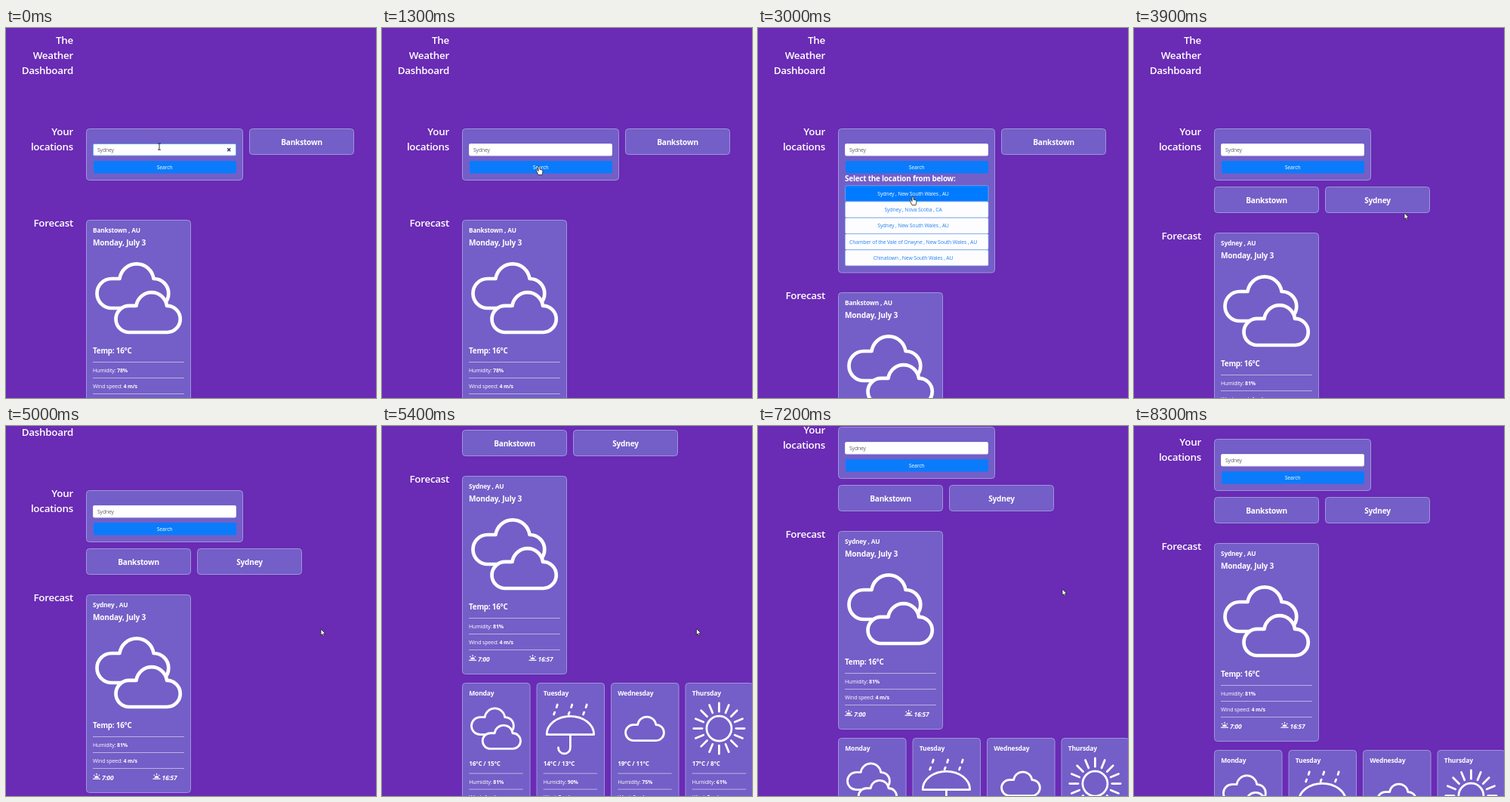
An HTML page with a canvas for the animation above (8400 ms loop, 490x490 px).

```html
<!DOCTYPE html>
<html lang="en">
<head>
<meta charset="utf-8">
<title>Weather</title>
<style>
html, body { margin: 0; width: 100%; height: 100%; overflow: hidden; background: #6a2bb5; }
canvas { display: block; width: 490px; height: 490px; }
</style>
</head>
<body>
<canvas id="stage"></canvas>
<script>
const LOOP = 8400, SIZE = 490;
const BG = '#6a2bb5', CARD = '#735fc7', EDGE = '#a093dd', RULE = '#bab0e4';
const canvas = document.getElementById('stage');
const ctx = canvas.getContext('2d');
const ratio = window.devicePixelRatio || 1;
canvas.width = canvas.height = SIZE * ratio;

const LIST_OPENS = 1500, PICKED = 3200;
const scrollKeys = [[4750, 0], [5000, 48], [5400, 205], [5900, 308], [6400, 308], [7100, 132], [7300, 132], [7600, 116]];
const pointerKeys = [
  [300, 203, 157], [800, 208, 183], [1500, 208, 183], [1900, 205, 238], [2050, 205, 238], [2200, 205, 223],
  [3200, 205, 223], [3900, 358, 245], [4500, 417, 269], [5000, 417, 269], [6100, 415, 267], [6400, 415, 267],
  [7100, 403, 216], [7300, 403, 216], [7800, 500, 190]
];
const places = [
  'Sydney , New South Wales , AU', 'Sydney , Nova Scotia , CA', 'Sydney , New South Wales , AU',
  'Chamber of the Vale of Orwyne , New South Wales , AU', 'Chinatown , New South Wales , AU'
];
const days = [
  ['Monday', clouds, '16°C / 15°C', '81%', '4 m/s'],
  ['Tuesday', umbrella, '14°C / 13°C', '90%', '3 m/s'],
  ['Wednesday', singleCloud, '19°C / 11°C', '75%', '6 m/s'],
  ['Thursday', sun, '17°C / 8°C', '61%', '5 m/s'],
  ['Friday', sunAndCloud, '17°C / 9°C', '58%', '4 m/s']
];

const ramp = (t, a, b) => Math.min(1, Math.max(0, (t - a) / (b - a)));

function track(keys, t, column, ease = p => p) {
  const next = keys.findIndex(key => key[0] > t);
  if (next === 0) return keys[0][column];
  if (next < 0) return keys[keys.length - 1][column];
  const a = keys[next - 1], b = keys[next];
  return a[column] + (b[column] - a[column]) * ease(ramp(t, a[0], b[0]));
}

function mix(from, to, p) {
  return `rgb(${from.map((v, i) => Math.round(v + (to[i] - v) * p))})`;
}

// Draws text whose capitals are centred on y; returns its width.
function text(str, x, y, size, { weight = 700, align = 'left', color = '#fff', style = '' } = {}) {
  ctx.font = `${style} ${weight} ${size}px "Open Sans", "Noto Sans", sans-serif`;
  ctx.letterSpacing = `${-0.02 * size}px`;
  ctx.textAlign = align;
  ctx.fillStyle = color;
  ctx.fillText(str, x, y + size * 0.36);
  return ctx.measureText(str).width;
}

function box(x, y, w, h, r, fill, edge, width = 1) {
  ctx.beginPath();
  ctx.roundRect(x, y, w, h, r);
  ctx.fillStyle = fill;
  ctx.fill();
  if (!edge) return;
  ctx.strokeStyle = edge;
  ctx.lineWidth = width;
  ctx.stroke();
}

const card = (x, y, w, h) => box(x, y, w, h, 4, CARD, EDGE);

function rule(x, y, w) {
  ctx.fillStyle = RULE;
  ctx.fillRect(x, y, w, 1);
}

function labelled(label, value, x, y) {
  const w = text(label + ' ', x, y, 7, { weight: 400 });
  text(value, x + w, y, 7);
}

function line(...points) {
  ctx.beginPath();
  for (let i = 0; i < points.length; i += 2) ctx.lineTo(points[i], points[i + 1]);
  ctx.stroke();
}

// Weather icons live in a 120 x 120 space.
const cloudPath = new Path2D('M19.5 0A19.5 19.5 0 0 1 19.5-39H30A22.7 22.7 0 0 1 75-39A19.5 19.5 0 0 1 75.5 0Z');

function cloud(x, y, scale) {
  ctx.save();
  ctx.translate(x, y);
  ctx.scale(scale, scale);
  ctx.lineWidth /= scale;
  ctx.fill(cloudPath);
  ctx.stroke(cloudPath);
  ctx.restore();
}

function clouds() {
  cloud(5, 73, 1);
  cloud(30, 105, 0.9);
}

function singleCloud() {
  cloud(17, 86.5, 0.91);
}

function rays(cx, cy, radius, inner, outer, count) {
  ctx.beginPath();
  ctx.arc(cx, cy, radius, 0, 2 * Math.PI);
  ctx.stroke();
  for (let i = 0; i < count; i++) {
    const c = Math.cos(2 * Math.PI * i / count), s = Math.sin(2 * Math.PI * i / count);
    line(cx + c * inner, cy + s * inner, cx + c * outer, cy + s * outer);
  }
}

function sun() {
  rays(60, 59.5, 28, 38, 57, 16);
}

function sunAndCloud() {
  rays(53, 52, 26, 35, 50, 8);
  cloud(30, 108, 0.9);
}

function umbrella() {
  ctx.beginPath();
  ctx.ellipse(60, 73, 53, 41, 0, Math.PI, 0);
  ctx.closePath();
  ctx.moveTo(60, 73);
  ctx.lineTo(60, 102.5);
  ctx.arc(46.5, 102.5, 13.5, 0, Math.PI);
  ctx.stroke();
  for (const x of [31, 64, 97]) {
    line(x, 6, x - 2, 12);
    line(x - 6, 23, x - 8, 28);
  }
}

function icon(draw, x, y, scale) {
  ctx.save();
  ctx.translate(x, y);
  ctx.scale(scale, scale);
  ctx.strokeStyle = '#fff';
  ctx.fillStyle = CARD;
  ctx.lineWidth = 4.7;
  ctx.lineCap = ctx.lineJoin = 'round';
  draw();
  ctx.restore();
}

function horizonSun(x, y) {
  ctx.fillStyle = ctx.strokeStyle = '#fff';
  ctx.lineWidth = 1.2;
  ctx.beginPath();
  ctx.arc(x, y + 1.5, 2.8, Math.PI, 0);
  ctx.fill();
  line(x - 5, y + 2.8, x + 5, y + 2.8);
  line(x, y - 4.5, x, y - 2.3);
  line(x - 3.8, y - 2.6, x - 2.8, y - 1.4);
  line(x + 3.8, y - 2.6, x + 2.8, y - 1.4);
}

function searchPanel(t, open) {
  card(106.5, 133.5, 207, open ? 190.5 : 68);
  const focused = t < 800;
  box(115.5, 153.5, 189, 15.5, 1.5, '#fff', focused ? '#6aa8fa' : '#ecebf8');
  text('Sydney', 121, 161.3, 6.8, { weight: 400, color: '#5b6068' });
  if (focused) {
    ctx.strokeStyle = '#27307c';
    ctx.lineWidth = 1.3;
    line(293.3, 159.3, 297.3, 163.3);
    line(297.3, 159.3, 293.3, 163.3);
  }
  box(116, 176, 189, 16.5, 1.5, '#0a7cfb');
  text('Search', 210, 184.4, 6.8, { weight: 400, align: 'center' });
  if (!open) return;

  text('Select the location from below:', 115, 199, 9.9);
  const enterFirst = ramp(t, 2160, 2310);
  const hover = [enterFirst, ramp(t, 1750, 1900) - enterFirst, 0, 0, 0];
  places.forEach((place, i) => {
    const y = 208.8 + i * 21.3;
    box(115.5, y, 189.5, 20.8, 1.5, mix([253, 253, 255], [0, 123, 255], hover[i]), '#8dbbf5', 0.6);
    const color = mix([40, 130, 240], [255, 255, 255], hover[i]);
    text(place, 205.5, y + 10.4, 6.9, { weight: 400, align: 'center', color });
  });
}

function place(name, x, y) {
  card(x, y, 138, 34);
  text(name, x + 69, y + 17.7, 10.1, { align: 'center' });
}

function today(y, city, humidity) {
  card(106.5, y + 0.5, 138, 262);
  text(city + ' , AU', 115, y + 14.3, 8.3);
  text('Monday, July 3', 115, y + 30.6, 10.1);
  icon(clouds, 115.5, y + 44, 1);
  text('Temp: 16°C', 115, y + 173.8, 9.8);
  for (const offset of [188, 209, 230]) rule(115, y + offset, 121);
  labelled('Humidity:', humidity, 115, y + 199.5);
  labelled('Wind speed:', '4 m/s', 115, y + 220.4);
  const clock = { style: 'italic' };
  horizonSun(120, y + 241.5);
  text('7:00', 127, y + 243.3, 8.3, clock);
  horizonSun(199.5, y + 241.5);
  text('16:57', 206.5, y + 243.3, 8.3, clock);
}

function dayCard([name, draw, temp, humidity, wind], i, top) {
  const x = 106.5 + (i % 4) * 98.5, y = top + Math.floor(i / 4) * 181, left = x + 8.7;
  card(x, y + 0.5, 89.5, 169);
  text(name, left, y + 14.3, 8.5);
  icon(draw, left + 0.3, y + 25.5, 0.59);
  text(temp, left, y + 106.7, 8.1);
  rule(left, y + 119.6, 71.5);
  labelled('Humidity:', humidity, left, y + 131);
  rule(left, y + 140.6, 71.5);
  labelled('Wind:', wind, left, y + 151.7);
}

function heading(str, y) {
  text(str, 89, y - 0.8, 13.4, { weight: 600, align: 'right' });
}

const arrow = new Path2D('M0 0V8.2L1.9 6.5 3.2 9.2 4.5 8.6 3.3 6 5.8 5.8Z');
const hand = new Path2D('M-1 1Q0-1 1 1V4.2L4 5Q5 5.5 5 7L4 11.5H-1L-3.2 7Q-3-0 -1 6.5Z');

function pointer(t) {
  const smooth = p => p * p * (3 - 2 * p);
  ctx.save();
  ctx.translate(track(pointerKeys, t, 1, smooth), track(pointerKeys, t, 2, smooth));
  ctx.strokeStyle = '#222';
  if (t < 550) {
    ctx.lineWidth = 0.9;
    line(0, -3.5, 0, 4);
    line(-2, -4, 2, -4);
    line(-2, 4.2, 2, 4.2);
  } else {
    const shape = t < PICKED ? hand : arrow;
    ctx.fillStyle = '#fff';
    ctx.lineWidth = 0.8;
    ctx.fill(shape);
    ctx.stroke(shape);
  }
  ctx.restore();
}

function render(t) {
  const picked = t >= PICKED;
  const open = t >= LIST_OPENS && !picked;
  const forecastTop = picked ? 271 : open ? 350 : 254;

  ctx.setTransform(ratio, 0, 0, ratio, 0, 0);
  ctx.fillStyle = BG;
  ctx.fillRect(0, 0, SIZE, SIZE);

  ctx.save();
  ctx.translate(0, -Math.round(track(scrollKeys, t, 1)));
  heading('The', 17);
  heading('Weather', 37);
  heading('Dashboard', 57);
  heading('Your', 138);
  heading('locations', 158);
  searchPanel(t, open);
  if (picked) {
    place('Bankstown', 106.5, 210.5);
    place('Sydney', 253.5, 210.5);
  } else {
    place('Bankstown', 322.5, 133.5);
  }
  heading('Forecast', forecastTop + 5);
  today(forecastTop, picked ? 'Sydney' : 'Bankstown', picked ? '81%' : '78%');
  days.forEach((day, i) => dayCard(day, i, forecastTop + 274));
  ctx.restore();

  pointer(t);
}

function tick() {
  render(performance.now() % LOOP);
  requestAnimationFrame(tick);
}
tick();
</script>
</body>
</html>
```
